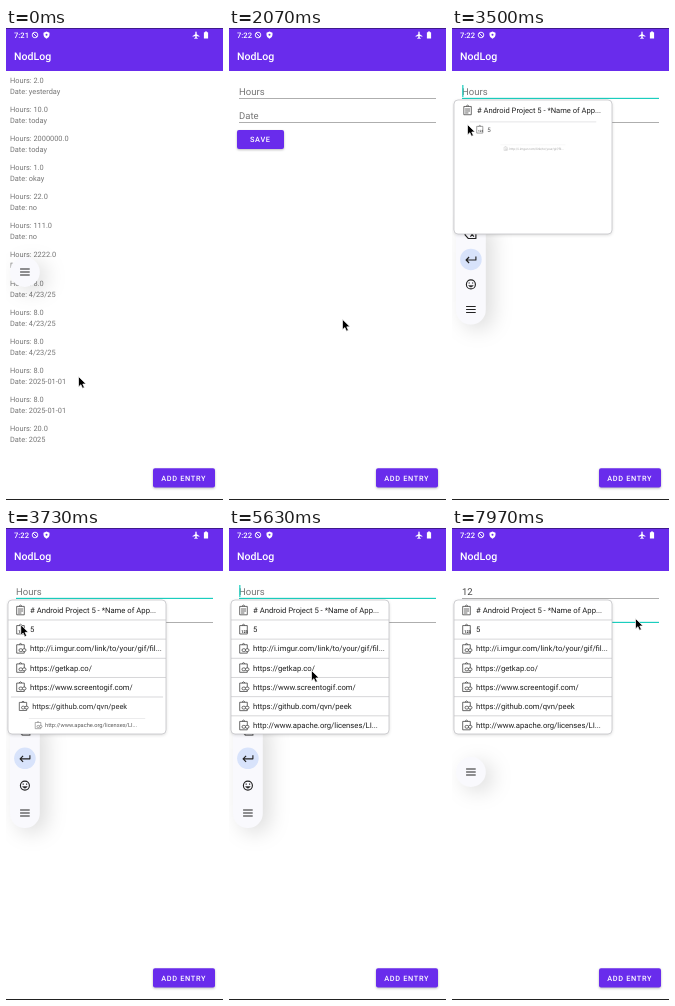
An HTML page that plays this animation: 217x472 px, repeating every 8 s.

```html
<!DOCTYPE html>
<html lang="en">
<head>
<meta charset="utf-8">
<title>Sleep log demo</title>
<style>
  html, body { margin: 0; width: 100%; height: 100%; overflow: hidden; background: #fff; }
  svg { display: block; width: 100%; height: 100%; }
  text { font-family: Roboto, sans-serif; text-rendering: geometricPrecision; white-space: pre; }
  .list text { font-size: 7.39px; fill: #757575; }
  .field { font-size: 9.5px; fill: #757575; }
  .btn text { font-size: 7.39px; font-weight: 500; letter-spacing: .66px; fill: #fff; }
  .btn rect { fill: #692cec; filter: drop-shadow(0 1px 1px #0004); }
  .row text { font-size: 7.7px; fill: #1f1f1f; }
  .pill { filter: drop-shadow(7px 5px 10px #0002); }
  .line { fill: none; stroke: #222; stroke-width: 1.15; stroke-linejoin: round; }
  .clip { fill: none; stroke: #444; stroke-width: .8; stroke-linejoin: round; }
</style>
</head>
<body>
<svg viewBox="0 0 217 472" preserveAspectRatio="none">
  <rect width="217" height="472" fill="#fff"/>
  <g id="list" class="list"></g>

  <g id="form">
    <text id="hours" class="field" x="10" y="66.6">Hours</text>
    <text class="field" x="10" y="90.7">Date</text>
    <rect id="hoursLine" x="10" width="197"/>
    <rect id="dateLine" x="10" width="197"/>
    <rect id="caret" y="57" width="1.1" height="12" fill="#03c9b7"/>
    <g class="btn">
      <rect x="8" y="102" width="47" height="19" rx="2"/>
      <text x="21" y="114.2">SAVE</text>
    </g>
  </g>

  <g class="btn">
    <rect x="147" y="440.2" width="62" height="19.4" rx="2"/>
    <text x="155.2" y="452.7">ADD ENTRY</text>
  </g>

  <rect width="217" height="43" fill="#692cec"/>
  <rect width="217" height="1" fill="#0006"/>
  <g fill="#fff">
    <text id="clock" x="8" y="9.7" font-size="7.6" font-weight="500"></text>
    <g fill="none" stroke="#fff" stroke-width=".9">
      <circle cx="29" cy="7" r="2.8"/>
      <path d="M27 5l4 4"/>
    </g>
    <path d="M40.5 3.5l3 1.2v2.2q0 2.6-3 3.8q-3-1.2-3-3.8V4.7z"/>
    <circle cx="40.5" cy="6.8" r="1" fill="#692cec"/>
    <path d="M190 3.6q.7 0 .7 1v1.6l2.7 1.8v.8l-2.7-.9v1.7l.9.7v.6l-1.6-.4-1.6.4v-.6l.9-.7V7.9l-2.7.9V8l2.7-1.8V4.6q0-1 .7-1z"/>
    <path d="M199 4.2v-.8h2v.8h1.1v6.4h-4.2V4.2z"/>
    <text x="8" y="32.3" font-size="10.56" font-weight="500">NodLog</text>
  </g>

  <g id="bar">
    <rect id="pill" class="pill" x="4" width="29.8" rx="14.9" fill="#f9f9fd"/>
    <g id="keys">
      <g class="line"><path d="M-2.5-4H5V4H-2.5L-6 0zM-.5-2L3 2M3-2L-.5 2"/></g>
      <g>
        <circle r="10.8" fill="#d8e3fb"/>
        <path class="line" d="M5-3V.5H-4.5M-1.8-2.5L-4.8 .5L-1.8 3.5"/>
      </g>
      <g class="line">
        <circle r="4.5"/>
        <path d="M-2.4 1Q0 4.4 2.4 1z" fill="#222" stroke-width=".4"/>
        <path d="M-1.7-2v1.2M1.7-2v1.2"/>
      </g>
    </g>
    <path id="menu" class="line" d="M-4.8-3H4.8M-4.8 0H4.8M-4.8 3H4.8"/>
  </g>

  <g id="popup">
    <rect x="2" y="72" width="158" height="134" rx="4" fill="#fff" stroke="#bcbcc0" stroke-width=".7"
      style="filter: drop-shadow(0 1px 1.5px #0002)"/>
    <g id="rows"></g>
  </g>

  <path id="cursor" d="M.5.5v10.4l2.4-2.2l1.6 3.6l1.9-.8l-1.6-3.5h3.3z" fill="#000" stroke="#fff" stroke-width=".7"/>
  <rect y="471" width="217" height="1" fill="#222"/>
</svg>

<script>
const $ = id => document.getElementById(id);
const clamp = u => Math.max(0, Math.min(1, u));
const set = (el, attrs) => { for (const k in attrs) el.setAttribute(k, attrs[k]); };
const show = (el, on) => el.setAttribute("visibility", on ? "visible" : "hidden");

const LOOP = 8000, FORM = 1730, FOCUS = 3200, TYPE1 = 6300, TYPE2 = 6480, DATE = 7830;
const TEAL = "#03c9b7";

const entries = [
  ["2.0", "yesterday"], ["10.0", "today"], ["2000000.0", "today"], ["1.0", "okay"],
  ["22.0", "no"], ["111.0", "no"], ["2222.0", "2"],
  ["8.0", "4/23/25"], ["8.0", "4/23/25"], ["8.0", "4/23/25"],
  ["8.0", "2025-01-01"], ["8.0", "2025-01-01"], ["20.0", "2025"]
];
$("list").innerHTML = entries.map(([h, d], i) => {
  const y = 55.1 + 29.03 * i;
  return `<text x="4" y="${y}">Hours: ${h}</text><text x="4" y="${y + 10.4}">Date: ${d}</text>`;
}).join("");

const clips = [
  "# Android Project 5 - *Name of App...", "5", "http://i.imgur.com/link/to/your/gif/fil...",
  "https://getkap.co/", "https://www.screentogif.com/", "https://github.com/qvn/peek",
  "http://www.apache.org/licenses/LI..."
];
const rowY = i => 82.4 + 19.17 * i;
const board = '<path class="clip" d="M-70.3-4H-62.7V4.4H-70.3zM-68-4.2Q-66.5-6.4-65-4.2"/>';
const badges = [
  '<path class="clip" d="M-69-1.4h5M-69 .6h5M-69 2.6h3.4"/>',
  '<text x="-68.8" y="3.2" style="font-size:3.8px;font-weight:700">123</text>',
  '<g class="clip"><rect x="-68" y="0" width="3.6" height="2.8" rx="1.4" fill="#fff"/><rect x="-64.6" y="0" width="3.6" height="2.8" rx="1.4" fill="#fff"/></g>'
];
// Row content is placed around the row centre so that it can scale from there.
$("rows").innerHTML = clips.map((s, i) => `<g class="row">
  ${i ? '<path d="M-79-9.6H79" stroke="#c4c4c8" stroke-width=".7"/>' : ""}
  ${board}${badges[Math.min(i, 2)]}<text x="-57" y="2.6">${s}</text></g>`).join("");
const rows = [...$("rows").children];
const keys = [...$("keys").children];

const path = [
  [0, 72, 348], [200, 72, 348], [1000, 161, 438], [1170, 162, 440], [1700, 162, 442],
  [2550, 41, 69], [2700, 40, 67], [3180, 38, 66], [3470, 15, 96], [4100, 13, 97], [4500, 13, 97],
  [5630, 82, 142], [6100, 88, 146], [7330, 88, 146], [7900, 183, 90], [8000, 183, 90]
];
function cursorAt(t) {
  const i = path.findIndex(p => p[0] > t);
  const [t0, x0, y0] = path[i - 1], [t1, x1, y1] = path[i];
  const u = (t - t0) / (t1 - t0), e = u * u * (3 - 2 * u);
  return [x0 + (x1 - x0) * e, y0 + (y1 - y0) * e];
}

// The line keeps its bottom edge and thickens upwards.
function underline(el, bottom, on) {
  const h = on ? 1.06 : .6;
  set(el, { y: bottom - h, height: h, fill: on ? TEAL : "#777" });
}

function toolbar(t) {
  const open = 1 - (1 - clamp((t - 3250) / 450)) ** 3;
  const p = open * (1 - clamp((t - 6350) / 250)) ** 2;
  const half = 14.9 + 41.2 * p;
  show($("bar"), t < FORM || t >= 3250);
  set($("pill"), { y: 244 - half, height: 2 * half });
  keys.forEach((k, i) => set(k, { transform: `translate(18.9 ${244 + (27.3 * i - 41) * p})` }));
  set($("keys"), { opacity: clamp(p * 2 - .6) });
  set($("menu"), { transform: `translate(18.9 ${244 + 41 * p})` });
}

function popup(t) {
  set($("popup"), { opacity: clamp((t - 3330) / 80) });
  rows.forEach((r, i) => {
    const s = 1 - (1 - clamp((t - 3370 - 48 * i) / 150)) ** 2;
    set(r, { transform: `translate(81 ${rowY(i)}) scale(${s})`, opacity: s });
  });
}

function draw(t) {
  const focus = t >= FOCUS && t < DATE;
  const typed = t < TYPE1 ? "" : t < TYPE2 ? "1" : "12";
  const blink = t < TYPE1 ? FOCUS : t < TYPE2 ? TYPE1 : TYPE2;

  $("clock").textContent = t < 600 ? "7:21" : "7:22";
  show($("list"), t < FORM);
  show($("form"), t >= FORM);

  $("hours").textContent = typed || "Hours";
  $("hours").style.fill = typed ? "#444" : "#757575";
  underline($("hoursLine"), 70.9, focus);
  underline($("dateLine"), 94.9, t >= DATE);
  show($("caret"), focus && (t - blink) % 1000 < 500);
  set($("caret"), { x: 10.3 + 5.35 * typed.length });

  toolbar(t);
  popup(t);
  set($("cursor"), { transform: `translate(${cursorAt(t)})` });
}

const start = performance.now();
function frame() {
  draw((performance.now() - start) % LOOP);
  requestAnimationFrame(frame);
}
frame();
</script>
</body>
</html>
```
